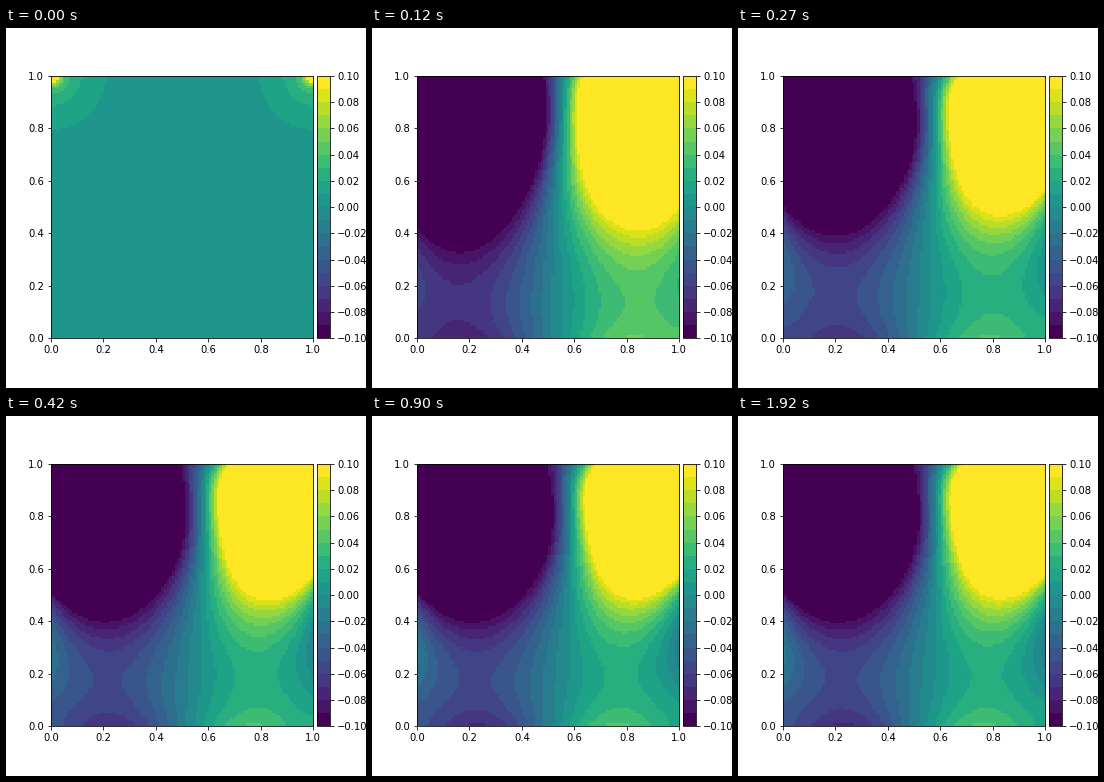
Recreate the animation shown at these times as a matplotlib script. Size 360 by 360 pixels, loop 4790 ms.

```python
import numpy as np
import matplotlib.pyplot as plt
from matplotlib.animation import FuncAnimation
from mpl_toolkits.axes_grid1 import make_axes_locatable

LOOP_MS, FRAMES, LAST_STEP = 4790, 160, 64
N, NU, LID = 100, 0.1, 1.0
FRAME_TIME, SUBSTEPS = 0.036, 12
H, DT = 1 / N, FRAME_TIME / SUBSTEPS
ZERO_X = 0.54  # the pressure is zero here on the bottom wall


def modes(n, edge):
    """Eigenpairs of the 1D second difference with a given end diagonal."""
    m = np.diag(np.full(n, -2.0)) + np.eye(n, k=1) + np.eye(n, k=-1)
    m[0, 0] = m[-1, -1] = edge
    return np.linalg.eigh(m / H**2)


def inverse(x_modes, y_modes, weight):
    (ax, vx), (ay, vy) = x_modes, y_modes
    w = weight(ax[:, None] + ay[None, :])
    return lambda f: vx @ ((vx.T @ f @ vy) * w) @ vy.T


def inv_poisson(lam):
    flat = np.abs(lam) < 1e-6
    return np.where(flat, 0, 1 / np.where(flat, 1, lam))


def inv_helmholtz(lam):
    return 1 / (1 - DT * NU * lam)


FACE, WALL, FREE = modes(N - 1, -2), modes(N, -3), modes(N, -1)
solve_u = inverse(FACE, WALL, inv_helmholtz)
solve_v = inverse(WALL, FACE, inv_helmholtz)
solve_p = inverse(FREE, FREE, inv_poisson)


def dx(f):
    return np.diff(f, axis=0) / H


def dy(f):
    return np.diff(f, axis=1) / H


def step(u, v, p):
    """One semi-implicit projection step on a staggered grid."""
    ue = np.hstack([-u[:, :1], u, 2 * LID - u[:, -1:]])
    ve = np.vstack([-v[:1], v, -v[-1:]])
    uc, vc = (u[1:] + u[:-1]) / 2, (v[:, 1:] + v[:, :-1]) / 2
    uv = (ue[:, 1:] + ue[:, :-1]) * (ve[1:] + ve[:-1]) / 4

    fu = u[1:-1] - DT * (dx(uc**2) + dy(uv[1:-1]) + dx(p))
    fv = v[:, 1:-1] - DT * (dy(vc**2) + dx(uv[:, 1:-1]) + dy(p))
    fu[:, -1] += 2 * LID * NU * DT / H**2
    u[1:-1], v[:, 1:-1] = solve_u(fu), solve_v(fv)

    div = dx(u) + dy(v)
    phi = solve_p(div / DT)
    u[1:-1] -= DT * dx(phi)
    v[:, 1:-1] -= DT * dy(phi)
    return p + phi - NU * div


def first_field():
    """Weak pressure peaks in the two lid corners."""
    c = (np.arange(N) + 0.5) * H
    x, y = np.meshgrid(c, c)
    r = np.hypot(np.minimum(x, 1 - x), 1 - y)
    return np.maximum(0.005, 0.01 + 0.016 * np.log(0.206 / r) + 1.3e-6 / r**3)


def simulate():
    u, v, p = np.zeros((N + 1, N)), np.zeros((N, N + 1)), np.zeros((N, N))
    fields = [first_field()]
    for _ in range(LAST_STEP):
        for _ in range(SUBSTEPS):
            p = step(u, v, p)
        fields.append((p - p[int(ZERO_X * N), 0]).T)
    return fields


fields = simulate()

plt.rcParams.update({"font.family": "DejaVu Sans", "font.size": 10})
fig, ax = plt.subplots(figsize=(5, 5), dpi=72)
fig.subplots_adjust(left=0.125, right=0.9, bottom=0.125, top=0.88)
image = ax.imshow(fields[0], origin="lower", extent=(0, 1, 0, 1),
                  cmap=plt.get_cmap("viridis", 20), vmin=-0.1, vmax=0.1,
                  interpolation="nearest")
ax.set_xticks(np.arange(6) / 5)
ax.set_yticks(np.arange(6) / 5)
cax = make_axes_locatable(ax).append_axes("right", size="5%", pad=0.05)
fig.colorbar(image, cax=cax, ticks=np.arange(-10, 11, 2) / 100)


def update(k):
    image.set_data(fields[min(k, LAST_STEP)])
    return [image]


anim = FuncAnimation(fig, update, frames=FRAMES, interval=LOOP_MS / FRAMES,
                     repeat=True, repeat_delay=0)
plt.show()
```
